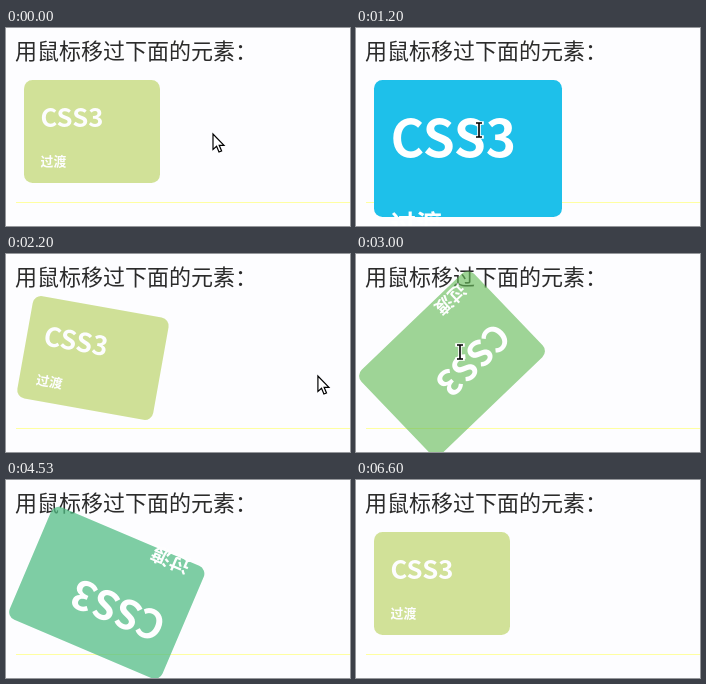
An HTML page for the animation above (6.67 s loop, 344 by 198 pixels).

```html
<!DOCTYPE html>
<html lang="zh-CN">
<head>
<meta charset="utf-8">
<style>
  html, body { margin: 0; width: 100%; height: 100%; overflow: hidden; background: #fdfdff; }
  body { position: relative; font-family: "Noto Sans CJK SC", "Noto Sans CJK", "Noto Sans", sans-serif; }
  p { position: absolute; left: 9px; top: 5px; margin: 0; font-size: 22px; line-height: 32px; color: #2b2b2b; white-space: nowrap; }
  hr { position: absolute; left: 10px; right: 0; top: 174px; height: 1px; margin: 0; border: 0; background: #ffffa2; }
  #box { position: absolute; left: 17.5px; top: 52px; box-sizing: border-box; padding: 17.1px; border-radius: 8.5px;
    color: #fff; font-weight: bold; line-height: 1.5; white-space: nowrap; }
  #box span { font-size: .5em; }
  svg { position: absolute; left: 0; top: 0; overflow: visible; }
</style>
</head>
<body>
<p>用鼠标移过下面的元素：</p>
<hr>
<div id="box">CSS3<br><span>过渡</span></div>
<svg id="cursor" width="1" height="1">
  <path id="arrow" d="M0 0V15.5L3.6 12.2 6 18 8.6 17 6.2 11.3H11Z" fill="#fff" stroke="#000" stroke-width="1.2"/>
  <g id="beam" fill="none">
    <path d="M-3-7H3M0-7V7M-3 7H3" stroke="#fff" stroke-width="3.6" stroke-linecap="square"/>
    <path d="M-3-7H3M0-7V7M-3 7H3" stroke="#000" stroke-width="1.6"/>
  </g>
</svg>
<script>
const LOOP = 6670, STEP = 66.7, ZOOM = 1.71;
const $ = id => document.getElementById(id);
const box = $('box'), cursor = $('cursor'), arrow = $('arrow'), beam = $('beam');

// Each hover: pointer enters, pointer leaves
const hovers = [[200, 1415], [2765, 4273]];

// Pointer path: time, x, y
const path = [
  [0, 207, 106], [200, 153, 103], [420, 123, 102], [1210, 123, 102], [1415, 206, 106],
  [1800, 315, 120], [2200, 312, 122], [2480, 290, 118], [2765, 153, 102], [3000, 104, 98],
  [4060, 104, 98], [4273, 206, 104], [4500, 360, 118], [LOOP, 360, 118]
];

const mix = (a, b, k) => a + (b - a) * k;
const clamp = v => Math.min(1, Math.max(0, v));

// CSS "ease": cubic-bezier(.25, .1, .25, 1)
function ease(x) {
  if (x <= 0 || x >= 1) return clamp(x);
  const curve = (a, b, s) => 3 * a * s * (1 - s) ** 2 + 3 * b * s * s * (1 - s) + s ** 3;
  let lo = 0, hi = 1;
  for (let i = 0; i < 24; i++) {
    const mid = (lo + hi) / 2;
    if (curve(.25, .25, mid) < x) lo = mid; else hi = mid;
  }
  return curve(.1, 1, lo);
}

function pointerAt(t) {
  const i = Math.max(1, path.findIndex(p => p[0] >= t));
  const [t0, x0, y0] = path[i - 1], [t1, x1, y1] = path[i];
  const k = (t - t0) / (t1 - t0);
  return [mix(x0, x1, k), mix(y0, y1, k)];
}

function draw(t) {
  let k = 0, over = false;
  for (const [enter, leave] of hovers) {
    k += ease((t - enter) / 1000) - ease((t - leave) / 1000);
    over = over || (t >= enter && t < leave);
  }
  const s = box.style;
  s.width = mix(80, 110, k) * ZOOM + 'px';
  s.height = mix(60, 80, k) * ZOOM + 'px';
  s.fontSize = mix(15, 30, k) * ZOOM + 'px';
  s.opacity = mix(.4, 1, k);
  s.background = `rgb(${mix(146, 30, k)}, ${mix(185, 192, k)}, ${mix(1, 234, k)})`;
  s.transform = `rotate(${360 * k}deg)`;

  const [x, y] = pointerAt(t);
  cursor.style.transform = `translate(${x}px, ${y}px)`;
  arrow.style.display = over ? 'none' : '';
  beam.style.display = over ? '' : 'none';
}

function tick() {
  const t = performance.now() % LOOP;
  draw(Math.min(99, Math.floor((t + 5) / STEP)) * STEP);
  requestAnimationFrame(tick);
}
tick();
</script>
</body>
</html>
```
